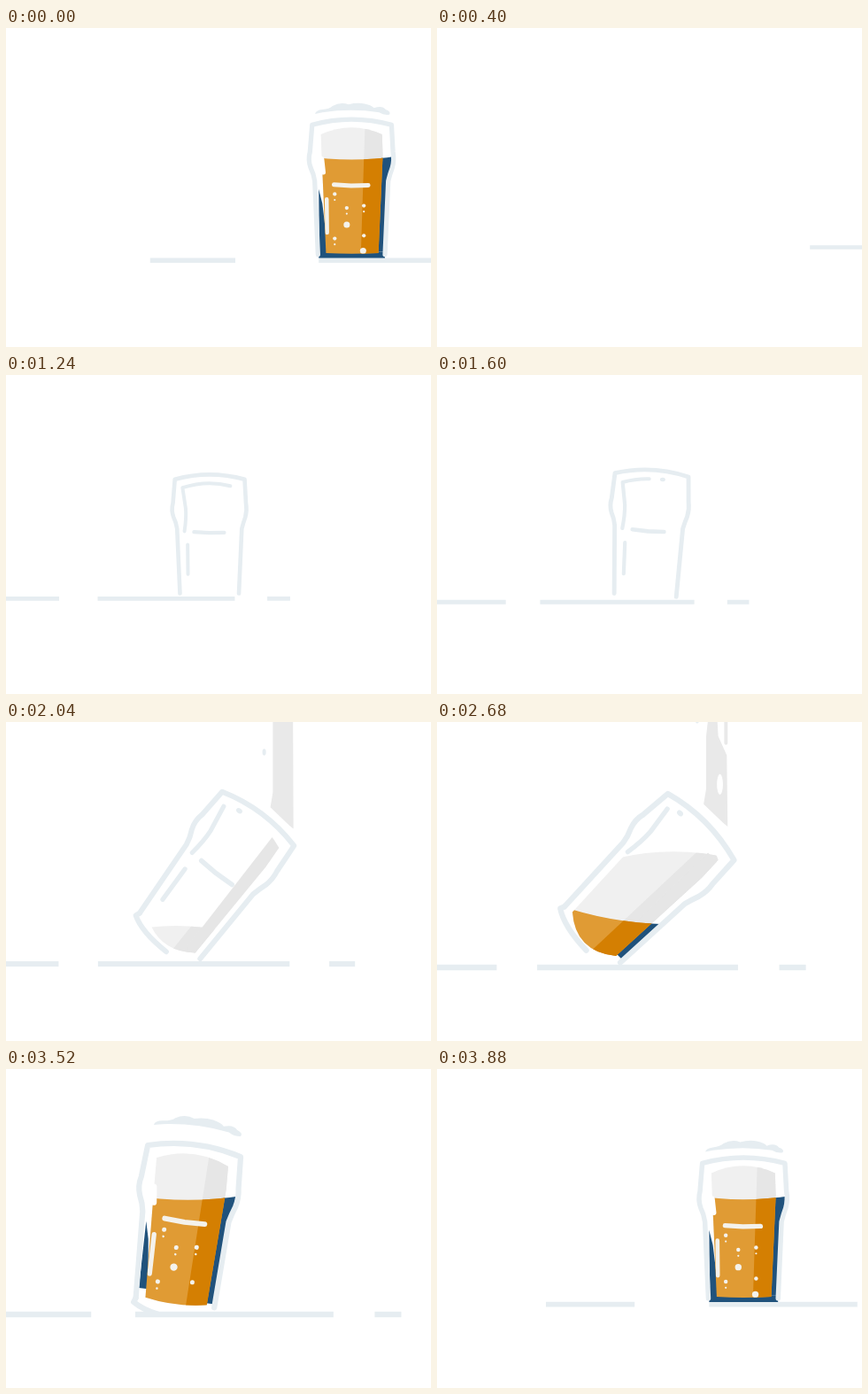
Write an HTML page with a canvas that moves like this. It is 480 by 360 pixels and loops after 3.92 s.

```html
<!DOCTYPE html>
<html lang="en">
<head>
<meta charset="utf-8">
<style>
html, body { margin: 0; width: 100%; height: 100%; overflow: hidden; background: #fff; }
canvas { display: block; width: 480px; height: 360px; }
</style>
</head>
<body>
<canvas id="stage" width="480" height="360"></canvas>
<script>
const g = document.getElementById('stage').getContext('2d');
const LOOP = 3920, GROUND = 100, HALF = 46;
const PALE = '#e6edf1', FOAM = '#f0f0f0', FOAM_DARK = '#e6e6e6', STREAM = '#e9e9e9';
const BEER = '#e09b34', BEER_DARK = '#d47f02', NAVY = '#20527c', SHINE = '#f4f2ec';

// Smooth step from 0 to 1 between two times.
function ease(t, from, to) {
  const u = Math.min(1, Math.max(0, (t - from) / (to - from)));
  return u * u * (3 - 2 * u);
}

// The camera arrives with a slowing lag and leaves in a growing rush.
const lag = t => 92 * Math.exp((880 - t) / 288);
const rush = t => {
  const u = t - LOOP;
  return u < 0 ? 241 * Math.exp(u / 145) : 241 + 480 * (1 - Math.exp(-u / 300));
};
const scroll = t => -121 + .022 * (t - 3120) - lag(t) + rush(t);
const zoom = t => .675 + .075 * ease(t, 560, 1700) + .22 * ease(t, 1480, 2250) - .295 * ease(t, 3660, 4180);
const tilt = t => .787 * (ease(t, 1480, 2250) - ease(t, 2920, 3720));
const pivot = t => scroll(t) + 200 - 109 * ease(t, 1500, 2300) + .78 * lag(t);
const beerTop = t => Math.max(-140, -26 - .123 * (t - 2680));
const foamTop = t => -16 - .131 * (t - 2040) - 60 * ease(t, 2680, 3000);

const outline = new Path2D('M46 -8 L50.5 -109 Q53 -119 56 -127 Q59 -138 57 -149 L55 -186 Q0 -201 -54 -186' +
  ' L-57 -149 Q-60 -138 -56 -127 Q-52 -119 -50.5 -109 L-46 -8');
const base = new Path2D('M-46 -8 L-48 -3 Q-30 9 8 10');
const shade = new Path2D('M19 -200 H80 V20 H12 Z');
const gaps = new Path2D('M-45 -98 L-40 -78 L-33 -20 H-44 Z M30 -12 L42 -150 L54 -151 L57 -137 L50 -109 L46 -12 Z');
const bottom = new Path2D('M-44 -24 H-34 L-30 -12 H45 L46 -3 H-45 Z');
const crown = new Path2D('M-50 -201 Q-49 -206 -40 -207 Q-30 -208 -26 -212 Q-15 -218 -4 -214 Q8 -217 18 -215' +
  ' Q28 -213 31 -209 Q42 -213 47 -207 Q55 -204 52 -200 Q44 -199 38 -203 Q0 -209 -40 -203 Z');
const bubbles = [[-6.5, -72], [-23, -30], [17, -75], [-23, -91], [17, -34], [-6.5, -49], [16, -13]];

function scoped(fn) { g.save(); fn(); g.restore(); }

function line(color, width, ...pts) {
  g.strokeStyle = color;
  g.lineWidth = width;
  g.beginPath();
  pts.forEach(p => g.lineTo(...p));
  g.stroke();
}

function shape(color, ...pts) {
  g.fillStyle = color;
  g.beginPath();
  pts.forEach(p => g.lineTo(...p));
  g.fill();
}

function dot(color, x, y, rx, ry = rx) {
  g.fillStyle = color;
  g.beginPath();
  g.ellipse(x, y, rx, ry, 0, 0, 7);
  g.fill();
}

// Clips to all that lies under a bowed surface which stays level in the world.
function below(angle, y, bow, slope = 0) {
  const m = g.getTransform();
  g.translate(0, y / Math.cos(angle));
  g.rotate(slope - angle);
  g.beginPath();
  g.moveTo(-300, 0);
  g.lineTo(-65, -bow);
  g.quadraticCurveTo(0, bow * 2, 65, -bow);
  g.lineTo(300, 0);
  g.lineTo(300, 500);
  g.lineTo(-300, 500);
  g.clip();
  g.setTransform(m);
}

function liquid(inside, light, dark) {
  g.fillStyle = light;
  g.fill(inside);
  g.clip(inside);
  g.fillStyle = dark;
  g.fill(shade);
}

function ground(t) {
  const x = scroll(t), late = Math.min(rush(t), 241), slow = lag(t);
  const end = x + 234 - .75 * slow - .21 * late;
  const left = x - 47 - .5 * slow - .28 * late;
  const right = end + 48 + .1 * slow;
  const bar = (a, b) => line(PALE, 6.6, [a, GROUND], [b, GROUND]);
  g.lineCap = 'butt';
  bar(left - 117, left);
  bar(x, end);
  bar(right, right + 31 + .18 * slow);
  g.lineCap = 'round';
}

// Reflections on the empty glass, shortening as it tips.
function reflections(t) {
  if (t < 800 || t > 2900) return;
  const e = 42 - 90 * ease(t, 1000, 2200), u = (e + 42) / 84;
  g.strokeStyle = PALE;
  g.lineWidth = 5.5;
  g.beginPath();
  g.moveTo(-39, t > 940 ? -105 : -140);
  g.quadraticCurveTo(-36, -125, -37, -140);
  g.lineTo(-42, -173);
  if (u > 0) g.quadraticCurveTo(-42 + 42 * u, -173 - 14 * u, e, -173 - 28 * u * (1 - u));
  if (e > 40) g.lineTo(42, -145);
  g.stroke();
  if (e < 30) dot(PALE, e + 20, -180, 4, 3);
}

function smile(t, color) {
  const s = 47 * ease(t, 780, 980);
  if (s > 0) line(color, 6, [23, -103], [23 - s / 2, -102.5], [23 - s, -104]);
  if (t > 1000) line(color, 5.5, [-34, -84], [-33.5, -38]);
}

function contents(t, a) {
  const sag = 40 * Math.sin(a) - 8;
  const inside = new Path2D(`M-42 -173 Q0 -192 42 -173 L43 -145 L37 -10 Q0 ${sag} -35 -10 L-41 -145 Z`);
  if (t > 780 && t < 980) scoped(() => {
    const c = 81 * Math.sin(Math.PI * (t - 780) / 200) - 220;
    g.clip(inside);
    shape(FOAM, [-60, -220], [c + 220, -220], [-60, c + 60]);
  });
  if (t < 1750) return;
  scoped(() => {
    below(a, foamTop(t), -5);
    liquid(inside, FOAM, FOAM_DARK);
  });
  if (t < 2860) scoped(() => {
    g.clip(inside);
    g.lineCap = 'butt';
    line(FOAM_DARK, 17, [36, -180 + 172 * ease(t, 2650, 2860)], [33, -178 + 170 * ease(t, 1750, 1900)]);
  });
  if (t > 2080) scoped(() => {
    below(a, beerTop(t), 3.5, .18 * (1 - ease(t, 2680, 3120)));
    g.fillStyle = NAVY;
    g.fill(gaps);
    if (a < .12) g.fill(bottom);
    liquid(inside, BEER, BEER_DARK);
    bubbles.forEach(([x, y], i) => {
      if (t < 2500 + i * 180) return;
      dot(SHINE, x, y, i > 4 ? 4.3 : 2.6);
      if (i < 4) dot(SHINE, x, y + 8, 1.3);
    });
    if (t > 2500) smile(t, SHINE);
  });
}

function glass(t) {
  const a = tilt(t);
  g.beginPath();
  g.rect(-600, -400, 1200, 497);
  g.clip();
  g.translate(pivot(t) - HALF * Math.cos(a), GROUND - HALF * Math.sin(a));
  g.rotate(a);
  reflections(t);
  if (t < 2500) smile(t, PALE);
  contents(t, a);
  if (t > 3200) line('#fff', 7, [-41, -139], [-39, -121]);

  g.strokeStyle = PALE;
  g.lineWidth = 6.4;
  if (a > .12) g.stroke(base);
  scoped(() => {
    const d = ease(t, 600, 1080);
    if (d < 1) g.setLineDash([560 * d, 2000]);
    if (d > 0) g.stroke(outline);
  });
  if (t > 2920) scoped(() => {
    const x = 55 - 115 * ease(t, 2920, 3320);
    g.translate(0, -12 * Math.sin(Math.PI * ease(t, 3160, 3720)));
    if (x > -40 && x < 40) dot(PALE, x - 17, -211, 6, 4);
    g.beginPath();
    g.rect(x, -260, 200, 100);
    g.clip();
    g.fillStyle = PALE;
    g.fill(crown);
  });
}

function pour(t) {
  if (t < 1630 || t > 2850) return;
  const d = t - 2680, tail = -205 + (d < 0 ? .3 * d : .0042 * d * d);
  scoped(() => {
    g.beginPath();
    g.rect(0, -300, 200, 80 + 160 * ease(t, 1630, 1760));
    g.clip();
    const l = Math.min(tail + 36, -95), r = Math.min(tail + 58, -72);
    shape(STREAM, [70, tail], [78, tail], [80, l], [90, r], [91, -64], [86, -68], [63, -90], [66, -108], [66, l]);
    if (d > -80) {
      const y = .3 * d - 113;
      dot('#fff', 82, y, 3.5, 12);
      line(STREAM, 4, [89, y - 98], [89, y - 48]);
    }
  });
  if (t > 1700 && t < 2760) {
    const u = (t - 1700) % 400 / 340;
    dot(PALE, 55.5, -200 + 43 * u * u, 2.2, 4);
  }
}

function scene(t) {
  ground(t);
  pour(t);
  if (t > 560) scoped(() => glass(t));
}

let start;
function frame(now) {
  start ??= now;
  const t = (now - start) % LOOP, k = zoom(t < 560 ? t + LOOP : t);
  g.setTransform(1, 0, 0, 1, 0, 0);
  g.fillStyle = '#fff';
  g.fillRect(0, 0, 480, 360);
  g.setTransform(k, 0, 0, k, 240, 180);
  g.lineCap = g.lineJoin = 'round';
  scene(t);
  // The previous round is still leaving on the right.
  if (t < 720) scene(t + LOOP);
  requestAnimationFrame(frame);
}
requestAnimationFrame(frame);
</script>
</body>
</html>
```
